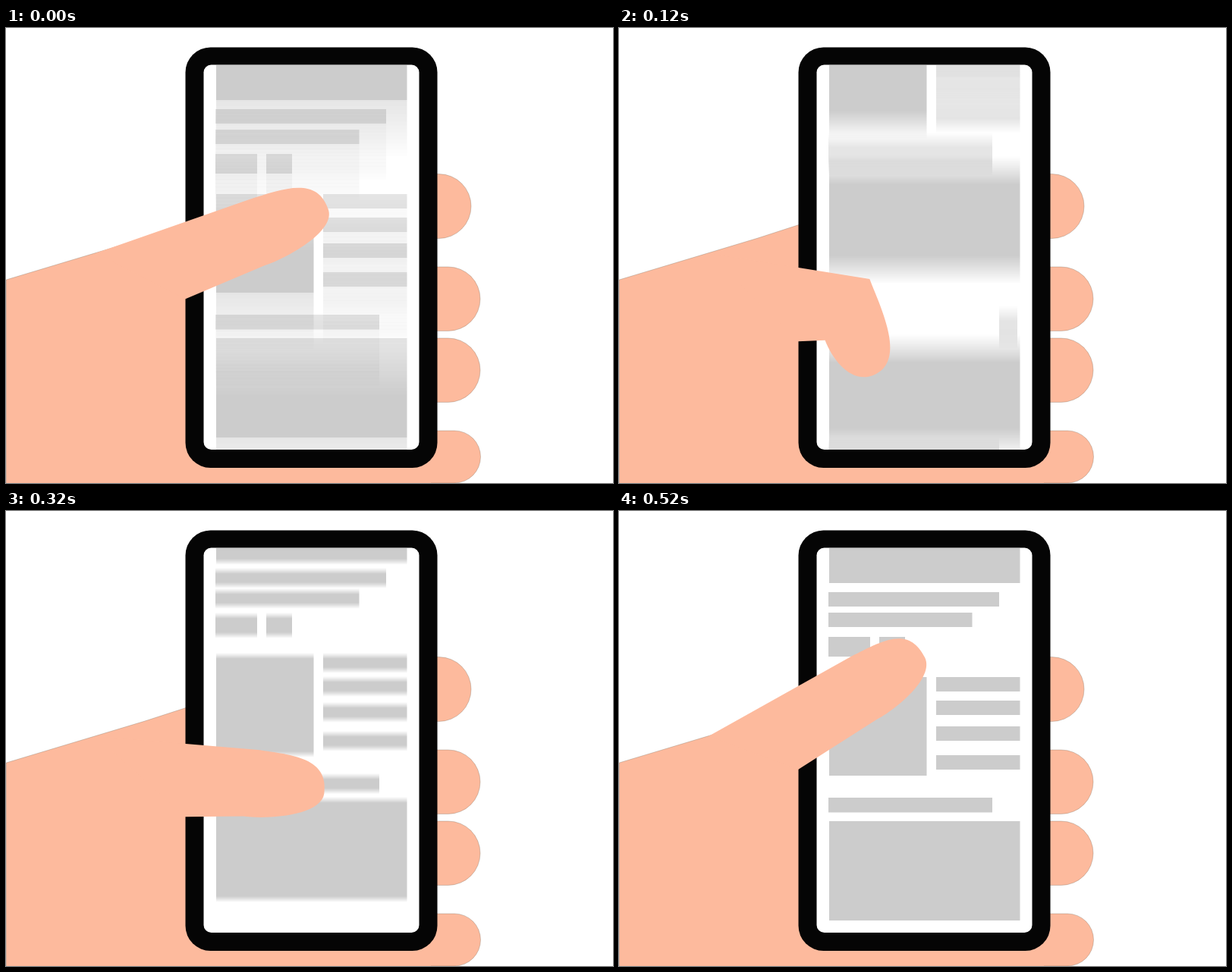
An HTML page with a canvas that plays this animation: 800x600 px, repeating every 0.6 s.

```html
<!DOCTYPE html>
<html lang="en">
<head>
<meta charset="utf-8">
<title>Thumb scrolling a phone</title>
<style>
  html, body { margin: 0; width: 100%; height: 100%; overflow: hidden; background: #fff; }
  canvas { display: block; }
</style>
</head>
<body>
<canvas id="stage" width="800" height="600"></canvas>
<script>
const ctx = document.getElementById('stage').getContext('2d');
const LOOP = 600, STEP = 40, LAST = 520;
const SKIN = '#fdba9d', LINE = 'rgba(80, 75, 60, .5)';
const PAGE = 673, SHUTTER = 20, SAMPLES = 32;

// The page repeats every PAGE pixels.
const block = (top, height, left = 277, right = 528.5) =>
  ({ left, right, top, bottom: top + height });
const blocks = [
  block(-29, 124),
  block(107, 19, 276, 501),
  block(134, 19, 276, 465.5),
  block(166, 26, 276, 331),
  block(166, 26, 343, 377),
  block(219, 130, 277, 405.5),
  ...[219, 250, 284, 322].map(y => block(y, 19, 418)),
  block(378, 19.5, 276, 492),
  block(409, 131),
  block(606, 20, 276, 343),
  block(606, 20, 501, 525)
];

// Thumb rig: time, angle at the root, tip.
const ROOT = { x: 118, y: 297 };
const swipe = [
  [0, -.337, 425, 240],
  [80, .005, 406, 395],
  [120, .159, 335, 458],
  [200, .306, 305, 488],
  [280, .304, 386, 475],
  [360, -.196, 437, 262],
  [LAST, -.51, 403, 193]
];

// Scroll distance: cubic-bezier(.148, 1, .679, 1) over the whole swipe.
function scrollAt(t) {
  const x = Math.min(Math.max(t / LAST, 0), 1);
  if (x === 0 || x === 1) return PAGE * x;
  let lo = 0, hi = 1;
  for (let i = 0; i < 30; i++) {
    const s = (lo + hi) / 2, r = 1 - s;
    if (3 * r * r * s * .148 + 3 * r * s * s * .679 + s ** 3 < x) lo = s; else hi = s;
  }
  return PAGE * (1 - (1 - lo) ** 3);
}

// Monotone cubic interpolation between the swipe keys.
function slope(i, k) {
  const a = swipe[i - 1], b = swipe[i], c = swipe[i + 1];
  if (!a || !c) return 0;
  const p = (b[k] - a[k]) / (b[0] - a[0]), q = (c[k] - b[k]) / (c[0] - b[0]);
  return p * q <= 0 ? 0 : 2 * p * q / (p + q);
}

function swipeAt(t) {
  let i = 0;
  while (i < swipe.length - 2 && t >= swipe[i + 1][0]) i++;
  const a = swipe[i], b = swipe[i + 1], h = b[0] - a[0], u = (t - a[0]) / h, v = 1 - u;
  return [1, 2, 3].map(k => v * v * (1 + 2 * u) * a[k] + u * u * (3 - 2 * u) * b[k]
    + h * u * v * (v * slope(i, k) - u * slope(i + 1, k)));
}

function roundRect(x, y, w, h, r, color) {
  ctx.beginPath();
  ctx.roundRect(x, y, w, h, r);
  ctx.fillStyle = color;
  ctx.fill();
}

function fillSkin(outline) {
  ctx.fillStyle = SKIN;
  ctx.fill();
  if (!outline) return;
  ctx.strokeStyle = LINE;
  ctx.lineWidth = .5;
  ctx.stroke();
}

function finger(top, bottom, right) {
  const r = (bottom - top) / 2;
  ctx.beginPath();
  ctx.moveTo(560, top);
  ctx.arc(right - r, top + r, r, -Math.PI / 2, Math.PI / 2);
  ctx.lineTo(560, bottom);
  fillSkin(true);
}

function drawHand() {
  ctx.beginPath();
  ctx.moveTo(.3, 600);
  ctx.lineTo(.3, 332);
  ctx.lineTo(183, 277);
  ctx.lineTo(240, 258.5);
  ctx.lineTo(240, 560);
  ctx.lineTo(592, 560);
  ctx.lineTo(592, 600);
  fillSkin(true);
  finger(192.5, 277.5, 613);
  finger(315, 399.5, 625);
  finger(409, 493.5, 625);
  finger(531, 600, 625.5);
}

function drawBlock({ left, right, top, bottom }, shifts) {
  const first = Math.max(49, Math.floor(top + Math.min(...shifts)));
  const end = Math.min(556, Math.ceil(bottom + Math.max(...shifts)));
  for (let y = first; y < end; y++) {
    let sum = 0;
    for (const d of shifts) sum += Math.max(0, Math.min(y + 1, bottom + d) - Math.max(y, top + d));
    const g = Math.round(51 * sum / shifts.length);
    ctx.fillStyle = `rgb(${g},${g},${g})`;
    ctx.fillRect(left, y, right - left, 1);
  }
}

// Motion blur: average the page over the open shutter, subtracting grey from white.
function drawPage(t) {
  const shifts = Array.from({ length: SAMPLES },
    (_, i) => scrollAt(t + SHUTTER * ((i + .5) / SAMPLES - .5)));
  ctx.save();
  ctx.beginPath();
  ctx.roundRect(261, 49, 284, 507, 10);
  ctx.clip();
  ctx.globalCompositeOperation = 'difference';
  for (const b of blocks) {
    drawBlock(b, shifts);
    drawBlock(b, shifts.map(d => d - PAGE));
  }
  ctx.restore();
}

function drawThumb(t) {
  const [angle, tx, ty] = swipeAt(t);
  const cos = Math.cos(angle), sin = Math.sin(angle);
  const at = (along, across) =>
    [ROOT.x + along * cos - across * sin, ROOT.y + along * sin + across * cos];

  // The inner joint slides back as the tip bends.
  const [kx, ky] = at(215, 0);
  const bend = Math.atan2(ty - ky, tx - kx) - angle;
  const [jx, jy] = at(222 - 38 * bend, 89);
  const dir = Math.atan2(ty - (ky + jy) / 2, tx - (kx + jx) / 2);
  const ex = Math.cos(dir), ey = Math.sin(dir);

  ctx.beginPath();
  ctx.moveTo(ROOT.x, ROOT.y);
  ctx.lineTo(kx, ky);
  ctx.bezierCurveTo(kx + 45 * ex, ky + 45 * ey, tx + 48 * ey, ty - 48 * ex, tx, ty);
  ctx.bezierCurveTo(tx - 30 * ey, ty + 30 * ex, jx + 30 * ex, jy + 30 * ey, jx, jy);
  ctx.lineTo(236, ROOT.y + (236 - ROOT.x) * sin / cos + 96 / cos);
  ctx.closePath();
  fillSkin(false);
}

function draw(t) {
  ctx.fillStyle = '#fff';
  ctx.fillRect(0, 0, 800, 600);
  drawHand();
  roundRect(236.5, 25.5, 332, 554.5, 33, '#050505');
  roundRect(260.5, 48.5, 284, 507.5, 10, '#fff');
  drawPage(t);
  drawThumb(t);
}

const start = performance.now();
let shown = -1;
function tick() {
  const now = (performance.now() - start) % LOOP;
  const t = Math.min(Math.floor(now / STEP) * STEP, LAST);
  if (t !== shown) draw(shown = t);
  requestAnimationFrame(tick);
}
tick();
</script>
</body>
</html>
```
